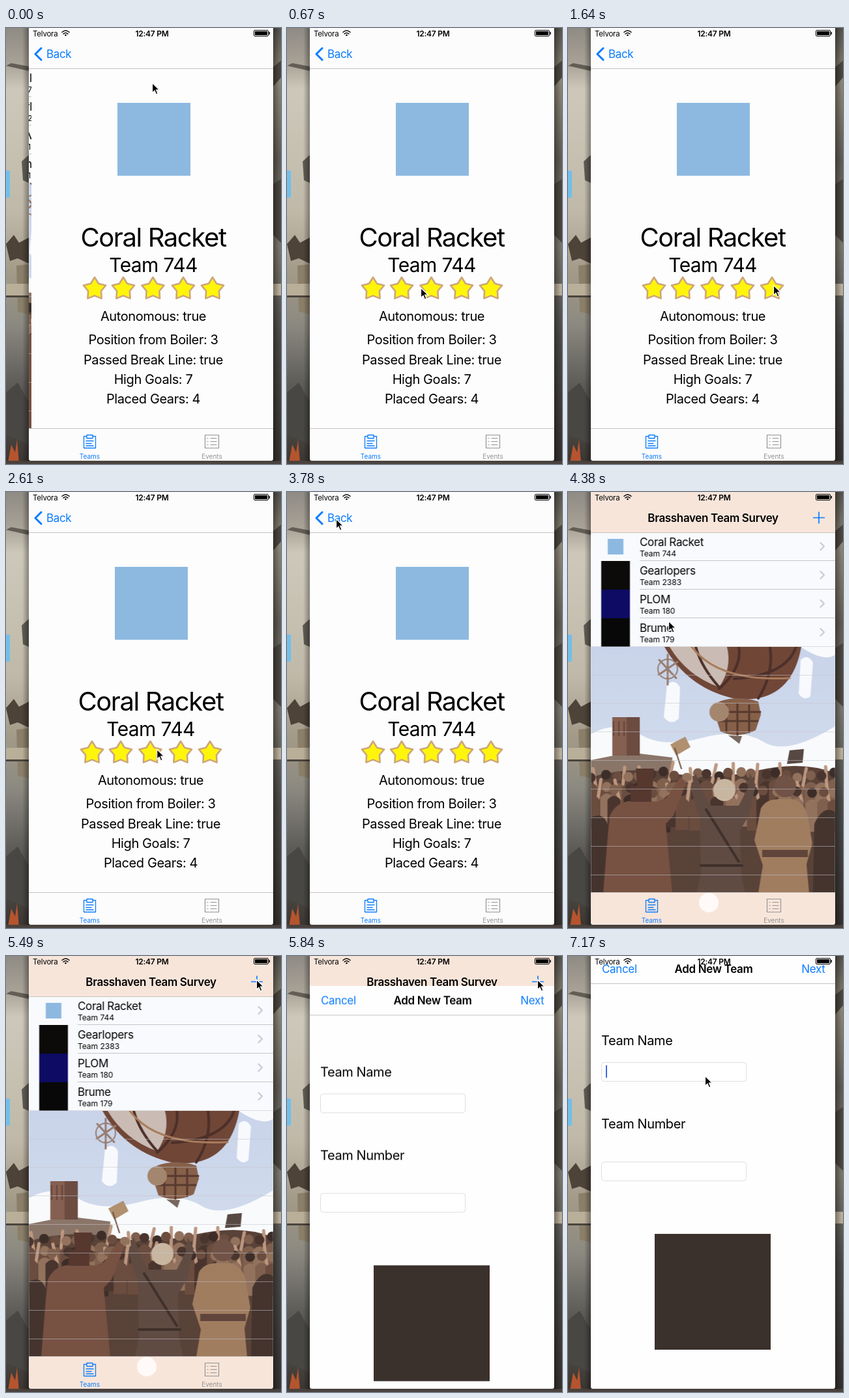
Recreate the animation shown at these times as an HTML page. Size 422 by 670 pixels, loop 8 s.

```html
<!DOCTYPE html>
<html lang="en">
<head>
<meta charset="utf-8">
<title>Team survey</title>
<style>
  html, body { margin: 0; width: 100%; height: 100%; overflow: hidden; background: #77736a; }
  svg { display: block; width: 422px; height: 670px; }
  text { font-family: Inter, "Open Sans", sans-serif; letter-spacing: -.02em; fill: #000; }
  .mid { text-anchor: middle; }
  .bold { font-weight: 600; }
  .blue { fill: #0a7cff; }
  .line { fill: none; stroke-linecap: round; stroke-linejoin: round; }
  .hair { stroke: #c6c3c1; stroke-width: 1; }
  .body { font-size: 20px; }
  .nav { font-size: 17px; }

  /* one 8 s timeline: 1% = 80 ms */
  .anim { animation: 8s linear infinite; }
  #detail, #list, #tint, #backLabel, #title, #modal { animation-timing-function: cubic-bezier(.23, .72, .2, 1); }
  #detail { animation-name: detail; }
  #list { animation-name: list; }
  #tint { animation-name: tint; }
  #backLabel { animation-name: backLabel; }
  #back { animation-name: backFade; }
  #title { animation-name: title; }
  #listNav { animation-name: listNav; }
  #modal { animation-name: modal; }
  #caret { animation-name: caret; animation-timing-function: step-end; }
  #cursor { animation-name: cursor; }

  @keyframes detail {
    0%, .75% { transform: translateX(4px); }
    2.625%, 48.125% { transform: translateX(0); }
    55%, 100% { transform: translateX(375px); }
  }
  @keyframes list {
    0%, .75% { transform: translateX(-111.3px); }
    2.625%, 48.125% { transform: translateX(-112.5px); }
    55%, 100% { transform: translateX(0); }
  }
  @keyframes tint {
    0%, 48.125% { opacity: 0; }
    55%, 100% { opacity: 1; }
  }
  @keyframes backLabel {
    0%, 48.125% { transform: translateX(0); }
    55%, 100% { transform: translateX(120px); }
  }
  @keyframes backFade {
    0%, 48.125% { opacity: 1; }
    50.4% { opacity: .08; }
    52%, 100% { opacity: 0; }
  }
  @keyframes title {
    0%, 48.125% { transform: translateX(-70px); }
    55%, 100% { transform: translateX(0); }
  }
  @keyframes listNav {
    0%, 49.6% { opacity: 0; }
    50.625% { opacity: .12; }
    53.5%, 100% { opacity: 1; }
  }
  @keyframes modal {
    0%, 70.375% { transform: translateY(667px); }
    75.74%, 100% { transform: translateY(0); }
  }
  @keyframes caret { 0% { opacity: 0; } 89.625%, 100% { opacity: 1; } }
  @keyframes cursor {
    0%, .75% { transform: translate(224px, 84px); }
    2.625%, 4.25% { transform: translate(224px, 367px); }
    8.375%, 10% { transform: translate(205px, 399px); }
    11.7% { transform: translate(150px, 385px); }
    13% { transform: translate(113px, 391px); }
    15% { transform: translate(180px, 402px); }
    17.5% { transform: translate(250px, 381px); }
    20.5%, 23% { transform: translate(315px, 395px); }
    24% { transform: translate(300px, 401px); }
    26% { transform: translate(220px, 381px); }
    28.5% { transform: translate(113px, 393px); }
    30.5% { transform: translate(170px, 402px); }
    32.625% { transform: translate(231px, 395px); }
    33.25%, 33.5% { transform: translate(238px, 393px); }
    34% { transform: translate(245px, 380px); }
    36% { transform: translate(235px, 190px); }
    38% { transform: translate(180px, 1px); }
    39.125%, 41.4% { transform: translate(135px, 24px); }
    46.25%, 52.25% { transform: translate(75px, 41px); }
    54.75%, 56.25% { transform: translate(154px, 198px); }
    59.875%, 61.4% { transform: translate(336px, 112px); }
    66% { transform: translate(394px, 60px); }
    68.625%, 73.5% { transform: translate(384px, 36px); }
    80.125%, 81% { transform: translate(209px, 193px); }
    84.375%, 100% { transform: translate(210px, 184px); }
  }
</style>
</head>
<body>
<svg viewBox="0 0 422 670">
  <defs>
    <clipPath id="screen"><path d="M35 0H410V661a4 4 0 0 1-4 4H39a4 4 0 0 1-4-4Z"/></clipPath>
    <clipPath id="photo"><path d="M35 238H410V616H35Z"/></clipPath>
    <linearGradient id="wallL" x2="0" y2="1">
      <stop offset="0" stop-color="#8f8b84"/><stop offset=".08" stop-color="#a8a196"/>
      <stop offset=".14" stop-color="#cdc8ba"/><stop offset=".42" stop-color="#c0b9a9"/>
      <stop offset=".56" stop-color="#a39a88"/><stop offset=".68" stop-color="#8b8980"/>
      <stop offset=".82" stop-color="#5d5b57"/><stop offset="1" stop-color="#3a3531"/>
    </linearGradient>
    <linearGradient id="wallR" x2="0" y2="1">
      <stop offset="0" stop-color="#55524c"/><stop offset=".12" stop-color="#8c8676"/>
      <stop offset=".3" stop-color="#5f5b53"/><stop offset=".5" stop-color="#79756a"/>
      <stop offset=".7" stop-color="#4b4a47"/><stop offset="1" stop-color="#34302d"/>
    </linearGradient>
    <linearGradient id="edge">
      <stop offset="0" stop-color="#000" stop-opacity="0"/><stop offset="1" stop-color="#000" stop-opacity=".35"/>
    </linearGradient>
    <linearGradient id="sky" x2="0" y2="1">
      <stop offset="0" stop-color="#c9d4ea"/><stop offset=".6" stop-color="#d4ddee"/><stop offset="1" stop-color="#f3f6fa"/>
    </linearGradient>
    <path id="star" d="M0-18L6-8.300L17.100-5.600L9.900 3.200L10.600 14.600L0 10.400L-10.600 14.600L-9.900 3.200L-17.100-5.600L-6-8.300Z"/>
  </defs>

  <!-- wallpaper -->
  <path d="M0 0H40V670H0Z" fill="url(#wallL)"/>
  <path d="M405 0H422V670H405Z" fill="url(#wallR)"/>
  <path d="M0 58L35 66V59L8 54ZM24 205L35 195V238L26 234Z" fill="#625d55"/>
  <path d="M0 332L12 318L20 330L35 322V362L18 354L6 358Z" fill="#4d4339"/>
  <path d="M16 365L35 363V440L18 436Z" fill="#8b7f69"/>
  <path d="M0 393H35V412H0ZM410 393H422V411H410Z" fill="#b9ae98"/>
  <path d="M0 411H35V414H0ZM410 60L422 50V76L410 90ZM410 240L422 232V330L410 318Z" fill="#4a453e"/>
  <path d="M0 219H4a2 2 0 0 1 2 2V259a2 2 0 0 1-2 2H0Z" fill="#72bfe8"/>
  <path d="M0 560L18 545L35 575V640L0 625Z" fill="#494744"/>
  <path d="M3 668L8 640L14 652L17 632L20 668Z" fill="#b5542f"/>
  <path d="M0 665H422V670H0Z" fill="#49423e"/>
  <path d="M25 0H35V666H25Z" fill="url(#edge)"/>
  <path d="M-420 0H-410V666H-420Z" fill="url(#edge)" transform="scale(-1 1)"/>

  <g clip-path="url(#screen)">
    <path d="M35 0H410V665H35Z" fill="#fdfdfd"/>

    <g id="list" class="anim">
      <path d="M35 62H410V238H35Z" fill="#f8fafd"/>
      <g id="rows"></g>
      <g clip-path="url(#photo)">
        <path d="M35 238H410V616H35Z" fill="url(#sky)"/>
        <path d="M35 372Q75 350 110 372T205 378T300 384T410 360V450H35ZM360 240Q395 262 410 250V238H355Z" fill="#f8fafc"/>
        <path d="M152 296Q164 286 172 300L170 348Q158 360 147 346ZM357 258Q368 248 376 262L372 314Q362 322 354 310Z" fill="#f7f9fd"/>
        <path d="M35 412L70 405L110 402L160 408V450H35Z" fill="#8a7569"/>
        <path d="M68 346H110V405H68Z" fill="#855f50"/>
        <path d="M90 346H110V405H90Z" fill="#6c4b41"/>
        <path d="M70 352V375M78 352V375M86 352V375" stroke="#654338" stroke-width="2"/>
        <path d="M148 238Q185 303 258 318Q342 326 358 238Z" fill="#704637"/>
        <path d="M156 238Q182 282 232 300Q252 270 244 238Z" fill="#cabcb4"/>
        <path class="line" d="M196 238Q205 270 232 300M262 238Q268 270 232 302M350 238Q335 282 255 287M310 238Q316 280 292 317" stroke="#4c2f29" stroke-width="4"/>
        <path class="line" d="M190 238Q230 292 340 286" stroke="#a97b5b" stroke-width="3"/>
        <circle class="line" cx="153" cy="272" r="15" stroke="#977c70" stroke-width="2"/>
        <path class="line" d="M140 258L166 286M139 281L168 261M153 250V296" stroke="#977c70" stroke-width="3"/>
        <path d="M232 322Q260 312 292 322L296 342L288 366Q260 380 234 368L226 344Z" fill="#87604a"/>
        <path class="line" d="M229 338H295M233 352H291M243 328V368M260 326V373M278 328V369" stroke="#573a2e" stroke-width="3"/>
        <circle cx="232" cy="338" r="15" fill="#a4866f"/>
        <path d="M246 374L267 375L263 387Z" fill="#76665d"/>
        <path d="M157 388L180 376L188 392L166 405Z" fill="#b0906f"/>
        <path class="line" d="M164 394L174 425" stroke="#6e5140" stroke-width="2"/>
        <path d="M35 438Q100 420 160 432T290 428T410 432V616H35Z" fill="#594238"/>
        <g id="crowd"></g>
        <path d="M52 616L64 498Q72 478 94 475L124 474Q148 480 156 462L172 438L182 446L162 497L150 510L160 616Z" fill="#775141"/>
        <path d="M96 452H128V476H96ZM104 425H132L130 452L142 457H90L106 451Z" fill="#56382f"/>
        <path d="M204 585L202 500L188 456L196 432L206 458L218 482H262L276 455L279 432L288 450L278 496L264 520L266 590L272 616H198Z" fill="#604b43"/>
        <circle cx="240" cy="458" r="17" fill="#c8b6a1"/>
        <path class="line" d="M212 488L262 568M204 574H267" stroke="#3f302b" stroke-width="4"/>
        <path d="M286 535L296 486Q304 472 322 472H344Q364 477 368 500L375 540L366 572L370 616H292L299 574Z" fill="#a17d60"/>
        <circle cx="333" cy="452" r="17" fill="#705346"/>
        <path d="M298 550H368V561H298Z" fill="#60453a"/>
        <path d="M378 510Q392 480 410 492V616H376ZM35 500Q56 490 62 515L54 616H35Z" fill="#45342e"/>
        <path d="M340 397L362 395L360 416L336 418Z" fill="#574843"/>
      </g>
      <g id="rules"></g>
    </g>

    <g id="detail" class="anim">
      <path d="M35 62H410V616H35Z" fill="#fdfdfd"/>
      <path d="M167 115H279V227H167Z" fill="#8db9e0"/>
      <text class="mid" x="222" y="336" font-size="40" style="letter-spacing:-.035em">Coral Racket</text>
      <text class="mid" x="222" y="375" font-size="30">Team 744</text>
      <g fill="#fff50a" stroke="#cda67c" stroke-width="2.6" stroke-linejoin="round">
        <use href="#star" x="132" y="401"/><use href="#star" x="176" y="401"/><use href="#star" x="221.5" y="401"/>
        <use href="#star" x="268" y="401"/><use href="#star" x="313" y="401"/>
      </g>
      <g class="mid body">
        <text x="222" y="450">Autonomous: true</text>
        <text x="222" y="486">Position from Boiler: 3</text>
        <text x="222" y="517">Passed Break Line: true</text>
        <text x="222" y="547">High Goals: 7</text>
        <text x="222" y="577">Placed Gears: 4</text>
      </g>
    </g>

    <!-- bars -->
    <path d="M35 0H410V62H35ZM35 616H410V665H35Z" fill="#fcfcfc"/>
    <g id="tint" class="anim">
      <path d="M35 0H410V62H35ZM35 616H410V665H35Z" fill="#f8e5da"/>
      <circle cx="216" cy="631" r="15" fill="#fffaf7"/>
    </g>
    <path class="hair" d="M35 62.5H410M35 615.5H410"/>
    <g id="back" class="anim">
      <path class="line" d="M54 31L45 40L54 49" stroke="#0a7cff" stroke-width="3"/>
      <text id="backLabel" class="anim nav blue" x="62" y="46">Back</text>
    </g>
    <g id="listNav" class="anim">
      <text id="title" class="anim nav bold mid" x="222.5" y="46">Brasshaven Team Survey</text>
      <path d="M376 39.5H394M385 30.5V48.5" stroke="#0a7cff" stroke-width="1.7"/>
    </g>
    <g class="line" stroke="#0a7cff" stroke-width="1.3">
      <path d="M124 627.5H119.5V645.5H137.5V627.5H133M124 625.5H133V630.5H124ZM123 634.5H134M123 638.5H131M123 642H134"/>
    </g>
    <g class="line" stroke="#959595" stroke-width="1.2">
      <path d="M305.5 625.5H326.5V645.5H305.5ZM314 630.5H323M314 635.5H323M314 640.5H323M309 630.5H310M309 635.5H310M309 640.5H310"/>
    </g>
    <text class="mid blue" x="128.5" y="661.5" font-size="10" style="letter-spacing:0">Teams</text>
    <text class="mid" x="316" y="661.5" font-size="10" style="fill:#929292;letter-spacing:0">Events</text>

    <g id="modal" class="anim">
      <path d="M35-2H410V667H35Z" fill="#fefefe"/>
      <path class="hair" d="M35 42.5H410"/>
      <g class="nav">
        <text class="blue" x="52" y="26">Cancel</text>
        <text class="bold mid" x="223.5" y="26">Add New Team</text>
        <text class="blue" x="394.5" y="26" text-anchor="end">Next</text>
      </g>
      <g class="body">
        <text x="51" y="137">Team Name</text>
        <text x="51" y="265">Team Number</text>
      </g>
      <g fill="#fff" stroke="#dedede">
        <rect x="51.5" y="163.5" width="222" height="29" rx="4"/>
        <rect x="51.5" y="316.5" width="222" height="29" rx="4"/>
      </g>
      <path id="caret" class="anim" d="M58 168H60V187H58Z" fill="#4269e0"/>
      <path d="M133 427H311V605H133Z" fill="#3a302c"/>
    </g>

    <!-- status bar -->
    <text x="41" y="12.5" font-size="11.5">Telvora</text>
    <g class="line" stroke="#000" stroke-width="1.5">
      <path d="M86 6.5Q91.5 1.5 97 6.5M88 9Q91.5 6 95 9"/>
    </g>
    <circle cx="91.5" cy="11" r="1.3"/>
    <text class="mid bold" x="224" y="12.5" font-size="12">12:47 PM</text>
    <rect x="380.5" y="3.5" width="22" height="9" rx="1.5" fill="none" stroke="#000"/>
    <path d="M382 5H401V11H382ZM403.5 6H405V10H403.5Z"/>
  </g>

  <g id="cursor" class="anim">
    <path d="M.5 .5V15.5L4 12.2L6.5 18L9 17L6.6 11.2H11.5Z" stroke="#fff" stroke-width="1.2"/>
  </g>
</svg>
<script>
  const byId = id => document.getElementById(id);

  const teams = [
    ['Coral Racket', 744, '#8db9e0', 24],
    ['Gearlopers', 2383, '#0c0b09', 44],
    ['PLOM', 180, '#0d0b63', 44],
    ['Brume', 179, '#080808', 44],
  ];
  byId('rows').innerHTML = teams.map(([name, number, color, size], i) => {
    const y = 62 + 44 * i;
    return `<rect x="${73 - size / 2}" y="${y + 22 - size / 2}" width="${size}" height="${size}" fill="${color}"/>
      <text class="nav" x="110" y="${y + 21}">${name}</text>
      <text x="110" y="${y + 37}" font-size="12" style="letter-spacing:0">Team ${number}</text>
      <path class="line" d="M387.5 ${y + 16}l5.5 5.5l-5.5 5.5" stroke="#c3c5d2" stroke-width="1.8"/>`;
  }).join('');

  let rules = '';
  for (let i = 1; i < 13; i++) {
    rules += `<path d="M${i < 4 ? 110 : 35} ${Math.round(62 + 43.9 * i) - .5}H410" stroke="#c5c5ca" stroke-opacity="${i < 4 ? 1 : .55}"/>`;
  }
  byId('rules').innerHTML = rules;

  let seed = 7;
  const rand = () => (seed = seed * 16807 % 2147483647) / 2147483647;
  const browns = ['#49352e', '#6b4d3f', '#7f5f4d', '#3d2d29', '#92725d'];
  let crowd = '';
  for (let i = 0; i < 44; i++) {
    const x = 35 + (i % 22) * 17.5 + rand() * 8;
    const y = 428 + (i > 21 ? 24 : 0) + rand() * 12;
    const color = browns[Math.floor(rand() * 5)];
    if (i % 2 === 0) {
      const lean = rand() * 16 - 8;
      crowd += `<path class="line" d="M${x + 8} ${y + 16}L${x + 8 + lean} ${y - 14}" stroke="#bd9780" stroke-width="5"/>`;
    }
    crowd += `<path d="M${x - 10} ${y + 60}V${y + 16}Q${x} ${y + 4} ${x + 10} ${y + 16}V${y + 60}Z" fill="${color}"/>
      <circle cx="${x}" cy="${y}" r="7.5" fill="${browns[(i * 3) % 5]}"/>`;
  }
  byId('crowd').innerHTML = crowd;
</script>
</body>
</html>
```
